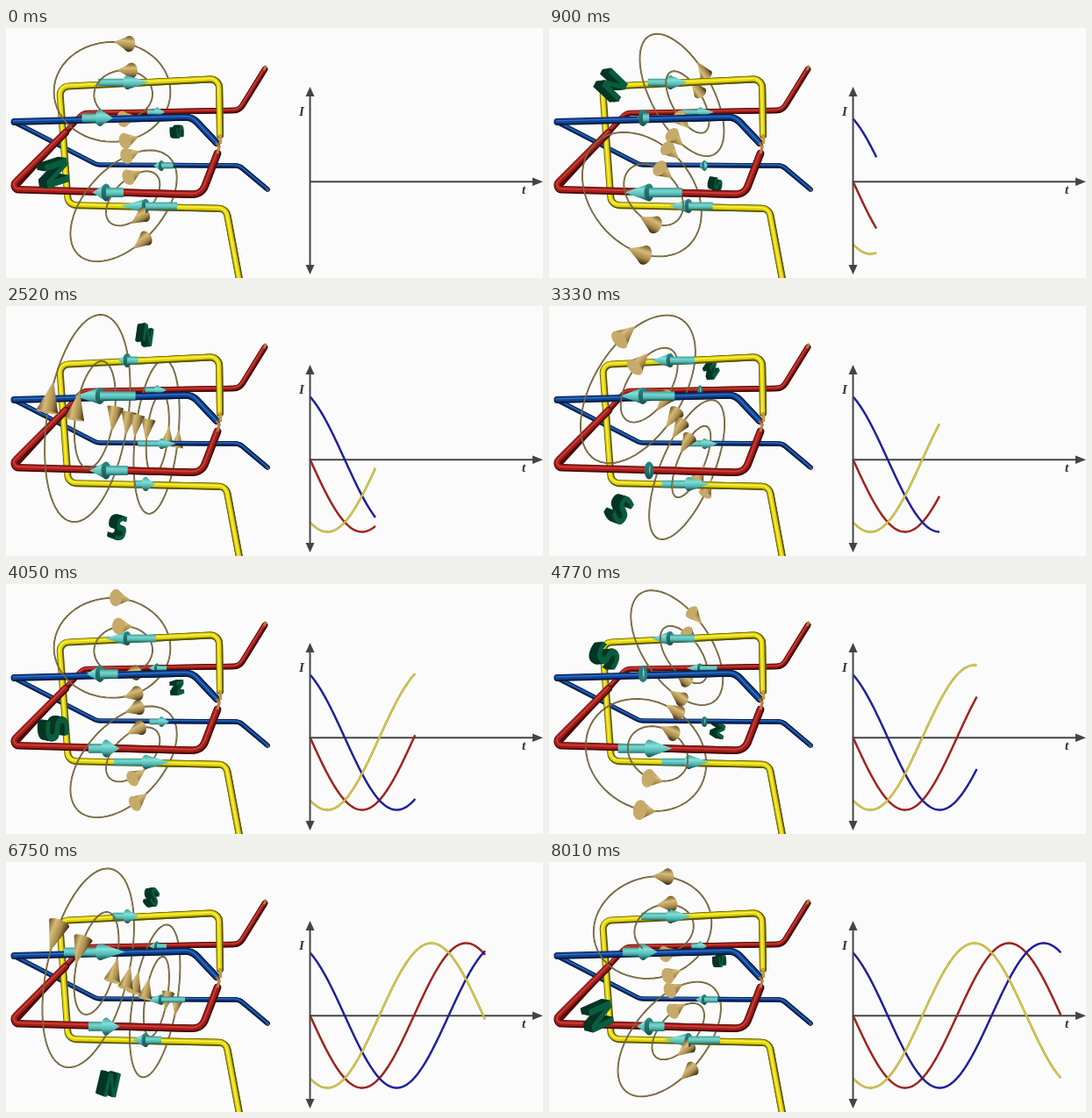
An HTML page with a canvas that plays this animation: 612x285 px, repeating every 8100 ms.

```html
<!DOCTYPE html>
<html>
<head>
<meta charset="utf-8">
<title>Rotating magnetic field</title>
<style>
html, body { margin: 0; width: 100%; height: 100%; overflow: hidden; background: #fbfbfb; }
canvas { display: block; }
</style>
</head>
<body>
<canvas id="stage" width="612" height="285"></canvas>
<script>
const ctx = document.getElementById('stage').getContext('2d');
const LOOP = 8100, STEP = 90, TAU = Math.PI * 2, RAD = Math.PI / 180;

const PAINT = {
  red: { dark: '#480a0a', main: '#a81c18', light: '#c9443c', curve: '#b8281e', edge: '#7c1414' },
  blue: { dark: '#061a42', main: '#0d4392', light: '#3474c4', curve: '#2226b4', edge: '#101078' },
  yellow: { dark: '#5e5800', main: '#e0d208', light: '#fbf24c', curve: '#e6d648', edge: '#a0942a' }
};
const PHASE = { red: 180, blue: 120, yellow: 240 };

// Wires from back to front; an arrow sits where each one crosses the field plane.
const WIRES = [
  { color: 'red', width: 6.5, bend: 13, pts: [[295, 47], [266, 94], [88, 97], [10, 182]],
    arrow: { x: 172, y: 96, head: 16, shaft: 22, r: 5.5, dir: -1 } },
  { color: 'blue', width: 5.5, bend: 13, pts: [[9, 107], [104, 156], [266, 157], [298, 184]],
    arrow: { x: 177, y: 157, head: 16, shaft: 27, r: 6, dir: -1 } },
  { color: 'yellow', width: 8, bend: 10, pts: [[244, 122], [243, 58], [61, 67], [71, 202], [251, 206], [267, 292]],
    arrow: { x: 138, y: 62, head: 24, shaft: 33, r: 8, dir: -1 },
    arrow2: { x: 159, y: 203, head: 27, shaft: 36, r: 8, dir: 1 } },
  { color: 'red', width: 8.5, bend: 15, pts: [[68, 119], [3, 184], [223, 190], [241, 143]],
    arrow: { x: 114, y: 187.5, head: 29, shaft: 40, r: 10, dir: 1 } },
  { color: 'blue', width: 8, bend: 18, pts: [[9.5, 107], [212, 101.5], [240, 131]],
    arrow: { x: 107, y: 102.5, head: 28, shaft: 41, r: 9.5, dir: 1 } }
];

function roundedPath(pts, bend) {
  ctx.beginPath();
  ctx.moveTo(...pts[0]);
  for (let i = 1; i < pts.length - 1; i++) {
    const tight = pts[i][0] < 12 ? 5 : bend;
    ctx.arcTo(...pts[i], ...pts[i + 1], tight);
  }
  ctx.lineTo(...pts[pts.length - 1]);
}

function strokeWith(color, width) {
  ctx.strokeStyle = color;
  ctx.lineWidth = width;
  ctx.stroke();
}

function line(x1, y1, x2, y2, color, width) {
  ctx.beginPath();
  ctx.moveTo(x1, y1);
  ctx.lineTo(x2, y2);
  strokeWith(color, width);
}

function polygon(pts, fill) {
  ctx.beginPath();
  pts.forEach(p => ctx.lineTo(...p));
  ctx.closePath();
  ctx.fillStyle = fill;
  ctx.fill();
}

function drawTube({ color, width, pts, bend }) {
  const c = PAINT[color];
  ctx.lineCap = 'round';
  ctx.lineJoin = 'round';
  roundedPath(pts, bend);
  strokeWith(c.dark, width);
  ctx.save();
  ctx.translate(-0.5, -0.6);
  roundedPath(pts, bend);
  strokeWith(c.main, width - 2.6);
  ctx.translate(-0.3, -0.5);
  roundedPath(pts, bend);
  strokeWith(c.light, width * 0.18);
  ctx.restore();
}

function shade(x1, y1, x2, y2, ...colors) {
  const g = ctx.createLinearGradient(x1, y1, x2, y2);
  colors.forEach((c, i) => g.addColorStop(i / (colors.length - 1), c));
  return g;
}

function drawArrow({ x, y, head, shaft, r, dir }, value) {
  const v = value * dir, m = Math.abs(v), s = Math.sign(v);
  const half = r * 0.53;
  const disc = color => {
    ctx.beginPath();
    ctx.ellipse(x, y, r * 0.55, r, 0, 0, TAU);
    ctx.fillStyle = color;
    ctx.fill();
  };
  const drawShaft = () => {
    const end = x - s * shaft * m;
    ctx.fillStyle = shade(0, y - half, 0, y + half, '#3f9f99', '#78d6ce', '#58bcb5', '#1f6f6c');
    ctx.fillRect(Math.min(x, end), y - half, Math.abs(end - x), half * 2);
  };
  const skin = shade(0, y - r, 0, y + r, '#3f9b96', '#82e0d9', '#4fb5ae', '#0f4546');
  const drawHead = () => polygon([[x, y - r], [x + s * (head * m + 1), y], [x, y + r]], skin);
  if (s > 0) {
    drawShaft();
    disc(m < 0.2 ? '#2b7d7b' : skin);
    drawHead();
  } else {
    drawHead();
    disc(shade(0, y - r, 0, y + r, '#2f8781', '#1b5553'));
    drawShaft();
  }
}

function drawWires(currents, front) {
  for (const w of WIRES) {
    const parts = w.arrow2 ? [[w.arrow, 0, 130], [w.arrow2, 130, 160]] : [[w.arrow, 0, 285]];
    for (const [a, top, height] of parts) {
      ctx.save();
      ctx.beginPath();
      ctx.rect(front ? a.x : 0, top, 612, height);
      ctx.clip();
      drawTube(w);
      drawArrow(a, currents[w.color]);
      ctx.restore();
    }
  }
}

function drawTips() {
  ctx.lineCap = 'butt';
  line(294, 48, 296.5, 43, '#b5783f', 3);
  line(244, 121, 244.5, 132, '#c89a3c', 3.5);
  line(239.5, 131, 243, 135, '#a8713c', 3);
  line(241, 143, 243.5, 134, '#c07c48', 3);
  line(297, 183, 299.5, 186, '#4a5578', 3);
}

// Perspective of the field plane: u comes forward to the left, v is up, z runs along the wires.
function project(u, v, z = 0) {
  const d = 1 - 0.28 * u - 0.0355 * v - 0.2 * z;
  return [143.5 + (-66.6 * u - 10 * v + 88 * z) / d, 135 + (22 * u - 111 * v + 6 * z) / d];
}

function fieldFrame(angle) {
  const c = Math.cos(angle), s = Math.sin(angle);
  return (along, side, z) => project(along * c - side * s, along * s + side * c, z);
}

function drawCone(at, along, side, dir, away) {
  const R = 0.078, base = along - dir * 0.105;
  const [bx, by] = at(base, side), tip = at(along + dir * 0.13, side);
  const disc = [];
  for (let i = 0; i < 24; i++) {
    const k = i / 24 * TAU;
    disc.push(at(base, side + R * Math.cos(k), R * Math.sin(k)));
  }
  const offset = p => (p[0] - bx) * (tip[1] - by) - (p[1] - by) * (tip[0] - bx);
  const sorted = [...disc].sort((p, q) => offset(p) - offset(q));
  const ends = [sorted[0], sorted[23]];
  if (ends[0][0] + ends[0][1] > ends[1][0] + ends[1][1]) ends.reverse();
  const skin = shade(...ends[0], ...ends[1], '#6e5829', '#d6bb78', '#a88a4c', '#352810');
  if (!away) polygon(disc, skin);
  polygon([ends[0], tip, ends[1]], skin);
  if (away) polygon(disc, '#c6aa69');
}

function drawField(angle) {
  const at = fieldFrame(angle);
  const loops = [
    { center: 0.55, half: 0.475, reach: 0.89 },
    { center: 0.525, half: 0.235, reach: 0.47 }
  ];
  const cones = [];
  for (const flip of [-1, 1]) {
    for (const { center, half, reach } of loops) {
      ctx.beginPath();
      for (let i = 0; i <= 72; i++) {
        const k = i / 72 * TAU;
        ctx.lineTo(...at(reach * Math.cos(k), flip * (center + half * Math.sin(k))));
      }
      strokeWith('#5c4f2c', 1.8);
      strokeWith('#a08d58', 0.7);
      cones.push([flip * (center + half), 1], [flip * (center - half), -1]);
    }
  }
  for (const [side, dir] of cones) drawCone(at, 0, side, dir, dir * Math.cos(angle) < 0);
}

function drawPole(letter, at, along) {
  const size = 0.0027, e = 0.1;
  ctx.font = 'bold 100px "DejaVu Sans", sans-serif';
  ctx.textAlign = 'center';
  ctx.textBaseline = 'alphabetic';
  const layers = 14;
  for (let i = 0; i <= layers; i++) {
    const z = -0.05 + 0.1 * i / layers;
    const p = at(along, 0, z);
    const slope = (a, b) => [0, 1].map(j => (a[j] - b[j]) / (2 * e) * size);
    const right = slope(at(along, e, z), at(along, -e, z));
    const up = slope(at(along + e, 0, z), at(along - e, 0, z));
    ctx.save();
    ctx.transform(right[0], right[1], -up[0], -up[1], p[0], p[1]);
    ctx.fillStyle = i === layers ? '#0a5c3e' : '#053626';
    ctx.fillText(letter, 0, 36);
    ctx.restore();
  }
}

function drawGraph(n) {
  const end = 2.66 * n, ink = '#444446';
  line(346, 175.3, 602, 175.3, ink, 2);
  polygon([[612, 175.3], [600, 170.5], [600, 180]], ink);
  ctx.lineCap = 'butt';
  ctx.lineJoin = 'round';
  if (n > 0) {
    for (const name of ['red', 'blue', 'yellow']) {
      ctx.beginPath();
      for (let i = 0, steps = Math.ceil(end); i <= steps; i++) {
        const x = end * i / steps;
        ctx.lineTo(346.5 + x, 175 - 82.5 * Math.sin(x / 237 * TAU + PHASE[name] * RAD));
      }
      strokeWith(PAINT[name].edge, 2.4);
      strokeWith(PAINT[name].curve, 1.2);
    }
  }
  line(346.5, 76, 346.5, 272, ink, 2);
  polygon([[346.5, 67], [341.5, 78], [351.5, 78]], ink);
  polygon([[346.5, 281], [341.5, 270], [351.5, 270]], ink);
  ctx.fillStyle = '#333';
  ctx.textAlign = 'center';
  ctx.textBaseline = 'alphabetic';
  ctx.font = 'italic bold 15px "Liberation Serif", serif';
  ctx.fillText('I', 337, 99.5);
  ctx.fillText('t', 590, 189);
}

function draw(time) {
  const n = Math.floor((time % LOOP) / STEP);
  const angle = n * 4 * RAD;
  const currents = {};
  for (const name in PHASE) currents[name] = Math.sin(angle + (PHASE[name] + 30) * RAD);

  ctx.fillStyle = '#fbfbfb';
  ctx.fillRect(0, 0, 612, 285);
  drawWires(currents, false);
  const at = fieldFrame(angle);
  drawField(angle);
  drawPole('N', at, 0.98);
  drawPole('S', at, -0.98);
  drawWires(currents, true);
  drawTips();
  drawGraph(n);
}

const start = performance.now();
function tick() {
  draw(performance.now() - start);
  requestAnimationFrame(tick);
}
tick();
</script>
</body>
</html>
```
